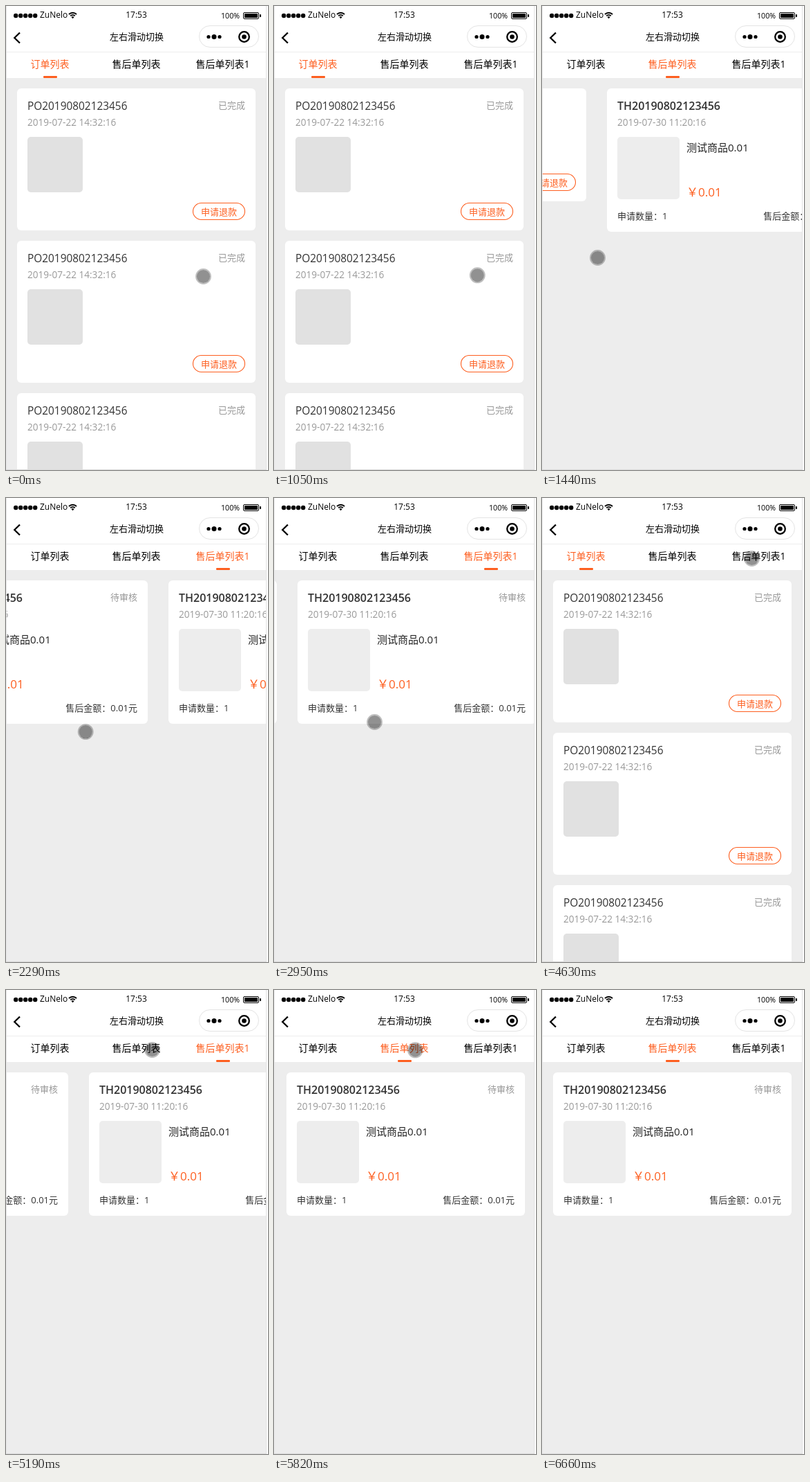
An HTML page for the animation above (7.4 s loop, 379 by 670 pixels).

```html
<!DOCTYPE html>
<html lang="zh-CN">
<head>
<meta charset="utf-8">
<title>左右滑动切换</title>
<style>
  html, body { margin: 0; width: 100%; height: 100%; overflow: hidden; background: #fff; }
  svg { display: block; width: 379px; height: 670px; }
  text { font-family: "Open Sans", "Noto Sans CJK SC", "Noto Sans CJK", sans-serif; white-space: pre; }
</style>
</head>
<body>
<svg id="stage" viewBox="0 0 379 670"></svg>
<script>
const LOOP = 7400, PAGE = 375, ACCENT = '#fd5f20';

// The picture refreshes in steps; all motion below is timed in steps
const STEP = 400 / 3, LEAD = 45;
const DRAG = 1.62, SETTLE = 3, GLIDE = 4.06;
const REACH = 226 / PAGE;   // share of a page covered by the finger

// at: release of a swipe, or moment of a tap
const GESTURES = [
  { at: 10.05, from: 0, to: 1, swipe: true },
  { at: 17.5, from: 1, to: 2, swipe: true },
  { at: 23.49, from: 2, to: 1, swipe: true },
  { at: 29.6, from: 1, to: 0 },
  { at: 36.264, from: 0, to: 2 },
  { at: 42.55, from: 2, to: 1 }
];

// Pointer key points: step, x, y
const POINTER = [
  [0, 285.5, 390.5], [6, 308.5, 390.5], [7.8, 308.5, 390.5], [11, 80.5, 363.5], [13, 225, 357],
  [15, 264, 352], [17.5, 78, 334], [22, 145.5, 323.5], [23.5, 240, 328], [26, 140, 113],
  [28, 71.5, 89.5], [32, 70, 89], [35, 303.5, 87.5], [36.2, 303.5, 87.5], [39, 211.5, 86.5],
  [46, 199, 87], [48, 197, 479], [49, 283.5, 636.5]
];
const POINTER_GONE = 50;

const clamp = u => Math.max(0, Math.min(1, u));
const easeOut = u => 1 - (1 - u) ** 1.7;
const easeInOut = u => u < .5 ? 4 * u ** 3 : 1 - 4 * (1 - u) ** 3;

const rect = (x, y, w, h, r, fill, more = '') =>
  `<rect x="${x}" y="${y}" width="${w}" height="${h}" rx="${r}" fill="${fill}" ${more}/>`;
const dot = (x, y, r, more = '') => `<circle cx="${x}" cy="${y}" r="${r}" ${more}/>`;
const label = (x, y, size, str, fill = '#000', more = '') =>
  `<text x="${x}" y="${y}" font-size="${size}" fill="${fill}" ${more}>${str}</text>`;
const END = 'text-anchor="end"', MID = 'text-anchor="middle"';
const repeat = (n, f) => Array.from({ length: n }, (_, i) => f(i)).join('');

function heading(y, code, date, state, bold) {
  return label(31, y + 31, bold ? 16 : 15.4, code, '#333', bold ? 'font-weight="600"' : '') +
    label(31, y + 54, 13.6, date, '#999') + label(346, y + 29, 13, state, '#999', END);
}

// A card without data loses its two heading lines, 42px in all
function orderCard(y, full) {
  const s = full ? 0 : -42;
  return rect(16, y, 345, 205 + s, 6, '#fff') +
    (full ? heading(y, 'PO20190802123456', '2019-07-22 14:32:16', '已完成', false) : '') +
    rect(31, y + 70 + s, 80, 80, 5, '#e1e1e1') +
    rect(270.5, y + 165.5 + s, 75, 24, 12, 'none', `stroke="${ACCENT}" stroke-width="1.1"`) +
    label(308, y + 182.7 + s, 13, '申请退款', ACCENT, MID);
}

function refundCard(y, full) {
  const s = full ? 0 : -42;
  return rect(16, y, 345, 207 + s, 6, '#fff') +
    (full ? heading(y, 'TH20190802123456', '2019-07-30 11:20:16', '待审核', true) : '') +
    rect(31, y + 70 + s, 90, 90, 5, '#ededed') +
    (full ? label(131, y + 91, 15, '测试商品0.01', '#222') : '') +
    label(131, y + 155.7 + s, 17, full ? '￥0.01' : '￥', ACCENT) +
    label(31, y + 189 + s, 13, full ? '申请数量：1' : '申请数量：', '#333') +
    label(346, y + 189 + s, 13, full ? '售后金额：0.01元' : '售后金额：元', '#333', END);
}

const orders = `<g class="orders">${repeat(3, i => orderCard(119 + 220 * i, true))}</g>
  <g class="refunds">${orderCard(119, false)}</g>`;
const refunds = `<g class="refunds">${refundCard(119, true)}</g>
  <g class="orders">${repeat(4, i => refundCard(119 + 180 * i, false))}</g>`;

const arc = r => {
  const d = r * Math.SQRT1_2;
  return `<path d="M${96.5 - d} ${17.5 - d}A${r} ${r} 0 0 1 ${96.5 + d} ${17.5 - d}"/>`;
};

const statusBar =
  repeat(5, i => dot(14.2 + 7 * i, 14, 3.2)) +
  label(49, 17, 12, 'ZuNelo') +
  `<g fill="none" stroke="#000" stroke-width="1.9">${arc(4.6)}${arc(7.8)}</g>` +
  '<path d="M96.5 18.2L94.5 16A2.8 2.8 0 0 1 98.5 16Z"/>' +
  label(188.5, 17, 12, '17:53', '#000', MID) +
  label(311, 18, 10.7, '100%') +
  rect(343.5, 9.5, 22, 9, 1.5, '#fff', 'stroke="#000"') +
  rect(345, 11, 19, 6, .5, '#000') + rect(367, 12, 2, 4, .8, '#000');

const navBar =
  '<path d="M20 38.5L12.3 46L20 53.5" fill="none" stroke="#000" stroke-width="2.3"/>' +
  label(189, 49, 13, '左右滑动切换', '#000', MID) +
  rect(279.5, 28.5, 86, 31, 15.5, '#fff', 'stroke="#e4e4e4"') +
  dot(293, 44.5, 2.6) + dot(301, 44.5, 3.5) + dot(309, 44.5, 2.6) +
  dot(344.5, 44.5, 7.3, 'fill="none" stroke="#000" stroke-width="2.3"') + dot(344.5, 44.5, 3.3) +
  rect(1, 66, 375, 1, 0, '#ededed');

const tabBar =
  ['订单列表', '售后单列表', '售后单列表1'].map((s, i) =>
    label(63.5 + 125 * i, 89, 14, s, '#000', `${MID} class="tab"`)).join('') +
  rect(54, 101, 20, 3, 1.2, ACCENT, 'id="mark"');

const stage = document.getElementById('stage');
stage.innerHTML =
  '<clipPath id="view"><rect x="1" y="104" width="375" height="565"/></clipPath>' +
  rect(0, 0, 379, 670, 0, '#fff') + rect(1, 104, 375, 565, 0, '#ededed') +
  `<g clip-path="url(#view)"><g id="strip">
    <g>${orders}</g>
    <g transform="translate(${PAGE})">${refunds}</g>
    <g transform="translate(${2 * PAGE})">${refunds}</g>
  </g></g>` +
  statusBar + navBar + tabBar +
  rect(0, 0, 1, 670, 0, '#e6e6e6') + rect(376, 0, 1, 670, 0, '#e2e2e2') + rect(0, 669, 377, 1, 0, '#dcdcdc') +
  `<g id="pointer">${dot(0, 0, 9.6, 'fill-opacity=".43"')}
    ${dot(0, 0, 10.5, 'fill="none" stroke="#000" stroke-opacity=".25" stroke-width="1.9"')}</g>`;

const strip = document.getElementById('strip');
const pointer = document.getElementById('pointer');
const mark = document.getElementById('mark');
const tabs = stage.querySelectorAll('.tab');
const orderParts = stage.querySelectorAll('.orders');
const refundParts = stage.querySelectorAll('.refunds');
const show = (el, on) => el.setAttribute('display', on ? 'inline' : 'none');
const move = (el, x, y = 0) => el.setAttribute('transform', `translate(${x} ${y})`);

// Share of the way from one page to the next
function progress({ at, swipe }, step) {
  if (!swipe) return easeInOut(clamp((step - at) / GLIDE));
  const pull = clamp((step - at) / DRAG + 1);
  const settle = easeOut(clamp((step - at) / SETTLE));
  return REACH * pull + (1 - REACH) * settle;
}

const scrollAt = step => PAGE * GESTURES.reduce((sum, g) => sum + (g.to - g.from) * progress(g, step), 0);

// A swipe picks its tab shortly before the finger lifts
const activeAt = step => GESTURES.findLast(g => step >= g.at - (g.swipe ? .5 : 0))?.to ?? 0;

function pointerAt(step) {
  const i = POINTER.findLastIndex(k => k[0] <= step);
  const [t0, x0, y0] = POINTER[i];
  const [t1, x1, y1] = POINTER[i + 1] ?? [Infinity, x0, y0];
  const u = (step - t0) / (t1 - t0);
  return [x0 + (x1 - x0) * u, y0 + (y1 - y0) * u];
}

function draw(time) {
  const step = Math.floor((time + LEAD) / STEP);
  const active = activeAt(step);
  move(strip, -Math.round(scrollAt(step)));
  move(pointer, ...pointerAt(step));
  show(pointer, step < POINTER_GONE);
  move(mark, 125 * active);
  tabs.forEach((el, i) => el.setAttribute('fill', i === active ? ACCENT : '#000'));
  orderParts.forEach(el => show(el, active === 0));
  refundParts.forEach(el => show(el, active !== 0));
}

const begin = performance.now();
function tick() {
  draw((performance.now() - begin) % LOOP);
  requestAnimationFrame(tick);
}
tick();
</script>
</body>
</html>
```
